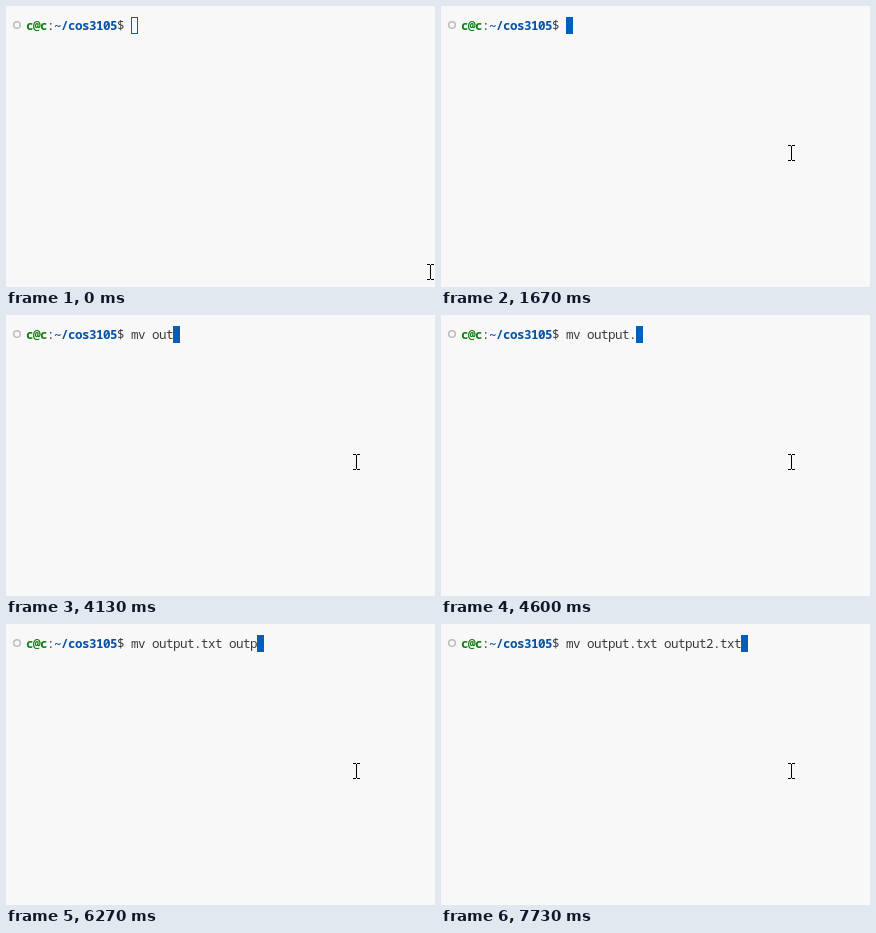
Animation, 429 px wide and 281 px high, one loop 8 s. Source, as an HTML page:

```html
<!DOCTYPE html>
<html lang="en">
<head>
<meta charset="utf-8">
<title>Terminal</title>
<style>
  html, body { margin: 0; width: 429px; height: 281px; overflow: hidden; background: #f8f8f8; }
  svg { display: block; }
  text {
    font: 500 12.6px "Noto Sans Mono", "DejaVu Sans Mono", monospace;
    letter-spacing: -0.56px; white-space: pre; fill: #3b3b3b;
  }
  .user { fill: #107c10; font-weight: 600; }
  .path { fill: #0451a5; font-weight: 600; }
</style>
</head>
<body>
<svg width="429" height="281" viewBox="0 0 429 281">
  <circle cx="11" cy="19" r="3.3" fill="none" stroke="#bdbdbd" stroke-width="1.5"/>
  <text x="20" y="24"><tspan class="user">c@c</tspan>:<tspan class="path">~/cos3105</tspan>$</text>
  <text id="typed" x="125" y="24"></text>
  <rect id="caret" x="125.5" y="11.5" width="6" height="16" stroke="#005fb8"/>
  <path id="beam" d="M0 .5h3M4 .5h3M3.5 1v14M0 15.5h3M4 15.5h3" fill="none" stroke="#000"/>
</svg>
<script>
const LOOP = 8000, STEP = 1000 / 15, CELL = 7, FOCUS = 1530;
const COMMAND = "mv output.txt output2.txt";

// Each key point is [time, value, ...]
const TYPING = [[3260, 0], [3330, 1], [3790, 4], [3990, 5], [4390, 9], [5330, 14],
  [5990, 16], [6530, 20], [6860, 21], [7730, 25]];
const POINTER = [[0, 421, 258], [330, 368, 168], [1340, 368, 168], [FOCUS, 347, 139]];

const linear = u => u;
const smooth = u => u * u * (3 - 2 * u);

function valueAt(points, t, ease) {
  const next = points.findIndex(p => p[0] > t);
  if (next < 1) return points.at(next).slice(1);
  const [a, b] = [points[next - 1], points[next]];
  const u = ease((t - a[0]) / (b[0] - a[0]));
  return a.slice(1).map((v, i) => v + (b[i + 1] - v) * u);
}

const [typed, caret, beam] = ["typed", "caret", "beam"].map(id => document.getElementById(id));

function draw(time) {
  const t = Math.floor((time + 5) / STEP) * STEP;
  const count = Math.floor(valueAt(TYPING, t, linear)[0]);
  const [x, y] = valueAt(POINTER, t, smooth).map(Math.round);
  typed.textContent = COMMAND.slice(0, count);
  caret.setAttribute("x", 125.5 + count * CELL);
  caret.setAttribute("fill", t < FOCUS ? "none" : "#005fb8");
  beam.setAttribute("transform", `translate(${x} ${y})`);
}

const start = performance.now();
function tick() {
  draw((performance.now() - start) % LOOP);
  requestAnimationFrame(tick);
}
tick();
</script>
</body>
</html>
```
